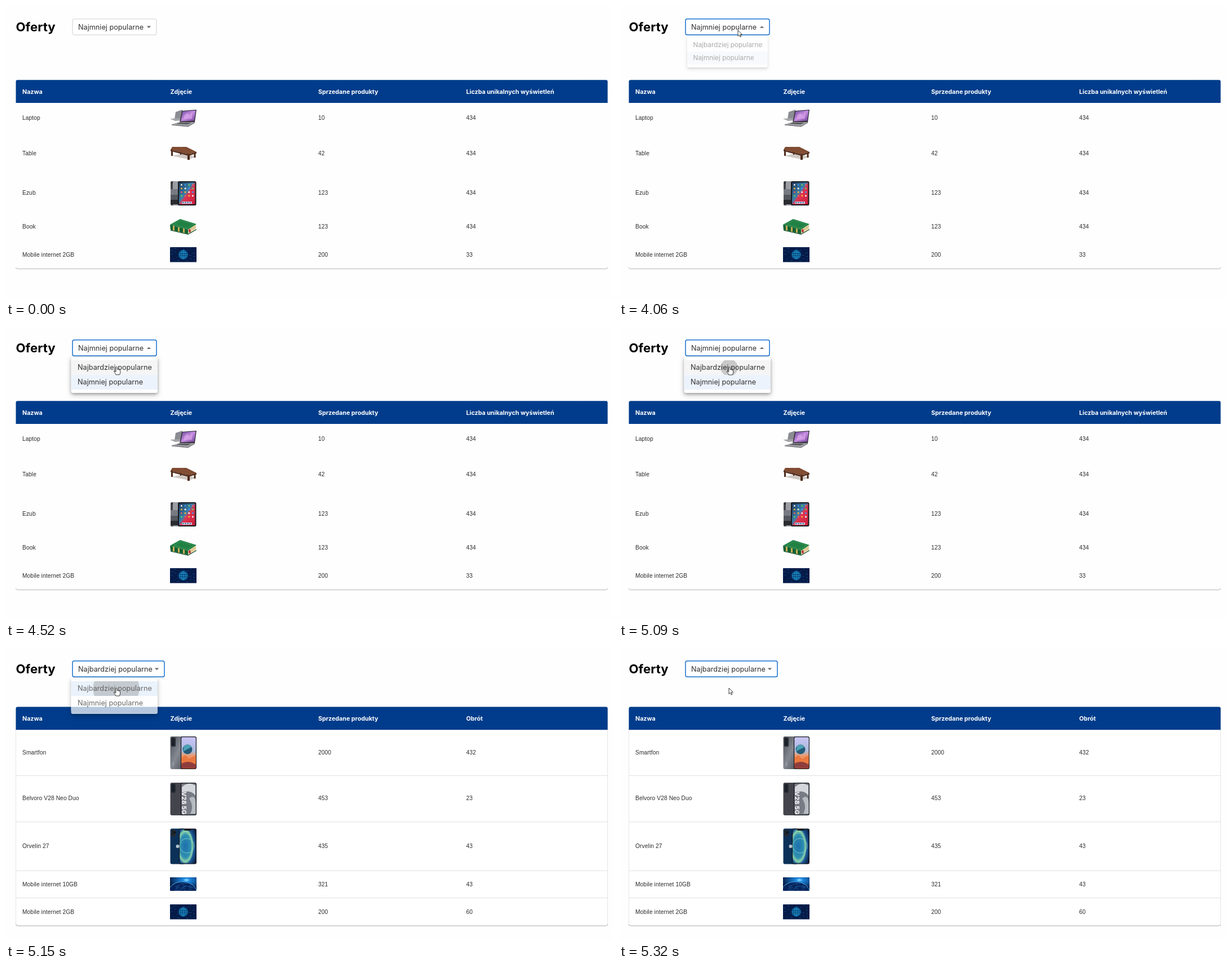
Recreate the animation shown at these times as an HTML page. Size 1077 by 520 pixels, loop 5810 ms.

```html
<!DOCTYPE html>
<html lang="pl">
<head>
<meta charset="utf-8">
<title>Oferty</title>
<style>
  html, body { margin: 0; width: 100%; height: 100%; overflow: hidden; background: #fefefe; }
  svg { display: block; }
  text { font: 10.2px "Liberation Sans", Arial, sans-serif; letter-spacing: .11px; fill: #2b2b2b; }
  .title, .head, .option { font-family: Poppins, Inter, sans-serif; letter-spacing: 0; }
  .title { font-size: 22.2px; font-weight: 700; fill: #000; }
  .head { font-size: 10.7px; font-weight: 700; fill: #fff; }
  .option { font-size: 12.7px; fill: #333; }
  .paper { fill: #fff; filter: drop-shadow(0 2px 2px #0003) drop-shadow(0 3px 4px #0004); }
  .plate text { font: 700 11px Inter, sans-serif; fill: #fff; }
</style>
</head>
<body>
<svg id="stage" width="1077" height="520" viewBox="0 0 1077 520">
  <defs>
    <linearGradient id="dusk" x2="0" y2="1">
      <stop stop-color="#c9c4f7"/><stop offset=".45" stop-color="#a9b9d8"/>
      <stop offset=".6" stop-color="#ee9a6c"/><stop offset="1" stop-color="#d9542f"/>
    </linearGradient>
    <linearGradient id="tabletSky" x2="1" y2="1">
      <stop stop-color="#203a5c"/><stop offset=".45" stop-color="#3c7fa8"/>
      <stop offset=".55" stop-color="#e0344f"/><stop offset="1" stop-color="#c81f3c"/>
    </linearGradient>
    <linearGradient id="steel" x2="1" y2="1">
      <stop stop-color="#4a4d55"/><stop offset=".5" stop-color="#858992"/><stop offset="1" stop-color="#4d5059"/>
    </linearGradient>
    <linearGradient id="lilac" x2="1" y2="1">
      <stop stop-color="#6c4a9c"/><stop offset=".5" stop-color="#c58be0"/><stop offset="1" stop-color="#71409b"/>
    </linearGradient>
    <radialGradient id="aqua" cx=".35" cy=".5" r=".75">
      <stop stop-color="#1d6fae"/><stop offset=".45" stop-color="#2f8fb0"/>
      <stop offset=".6" stop-color="#8fd6a8"/><stop offset=".7" stop-color="#1c5c9c"/><stop offset="1" stop-color="#0b2348"/>
    </radialGradient>
    <radialGradient id="orbit" cx=".62" cy=".2" r=".7">
      <stop stop-color="#9be4ff"/><stop offset=".2" stop-color="#1c86e0"/><stop offset="1" stop-color="#031338"/>
    </radialGradient>
    <clipPath id="firstItem"><rect x="115.5" y="59" width="153.5" height="26"/></clipPath>
    <clipPath id="earthBox"><rect x="291" y="407" width="47" height="24"/></clipPath>
  </defs>
  <text class="title" x="17.5" y="45">Oferty</text>
  <g id="tables"></g>
  <rect id="box" y="23" x="118" height="28.3" rx="3" fill="#fff"/>
  <text class="option" id="label" x="128" y="41.5"></text>
  <path id="arrow" d="M-3.7-1.8H3.7L0 1.9Z" fill="#6d6d6d"/>
  <g id="menu">
    <rect class="paper" x="115.5" y="53" width="153.5" height="64" rx="3"/>
    <rect id="item1" x="115.5" y="59" width="153.5" height="26"/>
    <rect id="item2" x="115.5" y="85" width="153.5" height="26"/>
    <text class="option" x="127" y="76">Najbardziej popularne</text>
    <text class="option" x="127" y="102">Najmniej popularne</text>
    <circle id="ripple" cx="195.5" cy="72" clip-path="url(#firstItem)"/>
  </g>
  <path id="cursor" fill="#fff" stroke="#222" stroke-width=".9" stroke-linejoin="round"/>
</svg>
<script>
const $ = id => document.getElementById(id);
const set = (id, attrs) => { for (const k in attrs) $(id).setAttribute(k, attrs[k]); };

const rect = (x, y, w, h, fill, rx = 0, more = '') =>
  `<rect x="${x}" y="${y}" width="${w}" height="${h}" fill="${fill}" rx="${rx}" ${more}/>`;
const disc = (x, y, r, fill) => `<circle cx="${x}" cy="${y}" r="${r}" fill="${fill}"/>`;
const path = (d, fill, more = '') => `<path d="${d}" fill="${fill}" ${more}/>`;
const line = (d, color, w = 1) => path(d, 'none', `stroke="${color}" stroke-width="${w}"`);
const text = (x, y, s, cls = '') => `<text x="${x}" y="${y}" class="${cls}">${s}</text>`;
const many = (n, f) => Array.from({ length: n }, (_, i) => f(i)).join('');

// Product pictures
const laptop = () =>
  path('M301 188L313 184L311 200L299 201Z', '#8b8c92') +
  path('M291 200L309 199L312 203L300 204Z', '#a4a5a9') +
  path('M312 186L338 184L335 206L308 207Z', '#34313d') +
  path('M313.5 187L336.5 185.3L334 203.5L310 204.5Z', 'url(#lilac)') +
  path('M317 193L322 190L326 195L331 188L330 200L315 201Z', '#e6b2ee', 'opacity=".55"') +
  path('M308 206L335 206L323 213L294 210Z', '#a2a2a5') +
  path('M309 207L329 207L322 210L302 209Z', '#55565b') +
  path('M294 210L323 213L335 206V207.5L323 214.5L294 211.5Z', '#6d6e72');

const table = () =>
  path('M294 266L324 272L337 268L316 261Z', '#cfc9c4') +
  path('M293 255H296V266H293ZM322 262H326V273H322ZM333.5 259H336.5V269H333.5ZM309 258H311V264H309Z', '#4d2a1a') +
  path('M295 250L320 250L338 259L324 263L292 255Z', '#7d4930') +
  path('M292 255L324 263L338 259V261.5L324 266L292 257.5Z', '#55301f') +
  line('M301 250.5L330 261M309 250.5L334 260M296 253L328 262', '#9b6546', .5);

const tablet = () =>
  rect(292, 311, 12, 43, '#45474c', 2) + rect(296, 311, 12, 43, '#9b9da3', 2) +
  rect(292, 325, 14, 10, '#777a82') + rect(292, 335, 14, 9, '#55575e') + rect(292, 344, 14, 8, '#292b30') +
  disc(294.5, 314, 1, '#15161a') +
  rect(305, 311, 32.5, 43, '#16181d', 2.5) + rect(307, 313, 28.5, 39, 'url(#tabletSky)', 1) +
  many(16, i => rect(310 + i % 4 * 6.7, 316 + (i >> 2) * 6.5, 2.7, 2.7,
    ['#f5f5f5', '#65cf68', '#ffb338', '#3798f5', '#f15a63'][i * 3 % 5], .7)) +
  rect(312, 347, 18, 4, '#d8c6d7', 1) + many(4, i => rect(313 + i * 4.2, 347.7, 2.4, 2.4, '#3878a8', .5));

const book = () =>
  path('M292 389L323 397L337 387V396L323 404L292 397Z', '#e9d7a5') +
  line('M323 399.5L337 390M323 401.5L337 392.5', '#b8a06c', .6) +
  path('M291 388L309 378L338 387L323 397Z', '#218145') +
  path('M291 388L323 397V404.5L292 397.5Z', '#126233') +
  path('M296 389.5L299 390.3V399L296 398.3ZM305 392L308 392.8V401L305 400.3ZM314 394.5L317 395.3V403L314 402.3Z', '#c9ae57') +
  line('M298 387.5L310 380.5L333 387.5L322 394.5Z', '#479e61', .7) +
  line('M292 398L323 405L338 396.5', '#124e2b', 1.2) +
  path('M324 397L327 396L328 402L326 401L325 403Z', '#ba2633');

const globe = y => `<g transform="translate(291 ${y})">` +
  rect(0, 0, 47, 26.5, '#051b48') +
  many(22, i => rect(i * 17 % 45, i * 7 % 25, 2 + i % 3, 1, '#123f78')) +
  disc(23.5, 13.3, 9, '#073a70') +
  line('M16.5 13.3a7 7 0 1 0 14 0a7 7 0 1 0-14 0H30.5M23.5 6.3V20.3M20 13.3a3.5 7 0 1 0 7 0a3.5 7 0 1 0-7 0M17.8 9.5H29.2M17.8 17H29.2',
    '#23a8de', .8) + '</g>';

const earth = () => '<g clip-path="url(#earthBox)">' + rect(291, 407, 47, 24, 'url(#orbit)') +
  `<ellipse cx="313" cy="433" rx="25" ry="18" fill="#06245c" stroke="#5acaff" stroke-width=".8"/>` +
  many(18, i => disc(296 + i * 11 % 34, 420 + i * 5 % 11, .6, '#58b7f2')) +
  line('M300 431Q306 414 322 418M307 431Q317 417 333 426', '#2d88d5', .5) + '</g>';

// Back of the phone on the left, screen on the right
const phone = (y, h, split, back, screen, lens) =>
  rect(291.5, y, 26, h, back, 3) + rect(293, y + 2, 8, lens * 4 + 4, '#262b34', 2) +
  many(lens, i => disc(296.5, y + 5 + i * 4.3, 1.8, '#090b10') + disc(296.5, y + 5 + i * 4.3, .7, '#53637a')) +
  rect(split, y, 338 - split, h, '#14171e', 3) +
  rect(split + 1.2, y + 1.3, 335.6 - split, h - 2.6, screen, 2);

const duskPhone = () => phone(157, 58, 310, 'url(#steel)', 'url(#dusk)', 3) +
  disc(322, 180, 8.5, '#245a78') + path('M316 174Q324 168 329 176Q320 180 314 184Z', '#4ba1b5') +
  path('M311.5 195L318 190L325 197L336.5 190V205L324 212L311.5 205Z', '#e9793f') +
  path('M311.5 205Q324 198 336.5 207V213H311.5Z', '#8f3d3c') + line('M297 203V209', '#b8bcc4', .8);

const greyPhone = () => phone(239, 58, 310, '#44454c', '#777b84', 3) +
  path('M312 247Q323 236 336 244V262Q328 250 312 257Z', '#d3d6db') +
  path('M325 267Q337 257 336.5 279V294H327Q334 281 325 267Z', '#b6bac1') +
  '<g class="plate" transform="translate(312 255) rotate(90)"><text>V28 5G</text></g>';

const bluePhone = () => phone(320.5, 63, 307, '#0c3158', 'url(#aqua)', 2) +
  disc(299.5, 327, 1.5, '#090b10') +
  `<circle cx="321" cy="351" r="13" fill="none" stroke="#93dfc3" stroke-width="1" opacity=".7"/>` +
  rect(316, 321, 13, 3, '#14171e', 1.5) + disc(304.5, 352, 3, '#b5c2cf');

// rows: [name, sold, last column, centre y]
const columns = [29, 291.5, 554, 816.5];
function sheet(id, top, bottom, last, rows, lines, pictures) {
  const heads = ['Nazwa', 'Zdjęcie', 'Sprzedane produkty', last];
  return `<g id="${id}">` +
    (lines.length ? rect(17.5, top, 1050, bottom - top, '#fff', 3, 'stroke="#e4e4e4"') : '') +
    line(`M17.5 ${bottom - 3}q0 3 3 3H1064.5q3 0 3-3`, '#b4b6b6') +
    path(`M17.5 ${top + 40.7}V${top + 3}q0-3 3-3H1064.5q3 0 3 3V${top + 40.7}Z`, '#003c8b') +
    heads.map((s, i) => text(columns[i], top + 24.5, s, 'head')).join('') +
    lines.map(y => line(`M18 ${y}H1067`, '#e0e0e0')).join('') +
    rows.map(([name, sold, count, y]) =>
      text(29, y + 3.6, name) + text(554, y + 3.6, sold) + text(816.5, y + 3.6, count)).join('') +
    pictures + '</g>';
}

const least = [['Laptop', 10, 434, 198.5], ['Table', 42, 434, 261], ['Ezub', 123, 434, 331],
  ['Book', 123, 434, 391], ['Mobile internet 2GB', 200, 33, 441]];
const most = [['Smartfon', 2000, 432], ['Belvoro V28 Neo Duo', 453, 23], ['Orvelin 27', 435, 43],
  ['Mobile internet 10GB', 321, 43], ['Mobile internet 2GB', 200, 60]];
const at = ys => most.map((row, i) => [...row, ys[i]]);

$('tables').innerHTML =
  sheet('least', 131.3, 466.5, 'Liczba unikalnych wyświetleń', least, [],
    laptop() + table() + tablet() + book() + globe(428)) +
  sheet('loading', 176.7, 421, 'Obrót', at([236.7, 274.7, 313.5, 351.7, 395.7]),
    [256, 294.4, 332.7, 371], globe(383)) +
  sheet('most', 104.6, 493, 'Obrót', at([185.8, 266.8, 351.8, 419.3, 468]),
    [226.5, 308.5, 395.3, 443.5], duskPhone() + greyPhone() + bluePhone() + earth() + globe(455));

// Timeline, ms
const LOOP = 5810, ENTER = 3630, MOVE = 3700, OPEN = 4000, AIM = 4230, HOVER = 4420,
  PRESS = 4973, CLOSE = 5100, SWAP = 5120, LOADED = 5150, GONE = 5290;

const ARROW = 'M0 0V10.5L2.5 8.3L4.2 12L5.8 11.3L4.2 7.7H7.4Z';
const HAND = 'M-1.2 .6Q0-1 1.2 .6V4.6Q2.4 3.8 3.2 5Q4.4 4.4 5 5.5Q6.6 5.2 6.6 7V10Q6.4 12 5.3 14H-1.2Q-2 11.5-4.3 9Q-5 7.3-3.2 7.6L-1.2 9Z';

// cubic-bezier(.4, 0, .2, 1) over the span from..from + length
function ease(t, from, length) {
  const p = Math.min(1, Math.max(0, (t - from) / length));
  let lo = 0, hi = 1;
  for (let i = 0; i < 20; i++) {
    const s = (lo + hi) / 2, r = 1 - s;
    if (1.2 * r * r * s + .6 * r * s * s + s ** 3 < p) lo = s; else hi = s;
  }
  return lo * lo * (3 - 2 * lo);
}

function draw(t) {
  const swapped = t >= SWAP, open = t >= OPEN && t < SWAP, hover = t >= HOVER;
  const show = { least: !swapped, loading: swapped && t < LOADED, most: t >= LOADED,
    menu: t >= OPEN && t < GONE, cursor: t >= ENTER };
  for (const id in show) $(id).style.display = show[id] ? '' : 'none';

  const go = ease(t, MOVE, 280), aim = ease(t, AIM, 340);
  const x = 22 + 189 * go - 16 * aim, y = 43 + 28 * aim;
  const hand = hover && t < GONE;
  set('cursor', { d: hand ? HAND : ARROW, transform: `translate(${x + (hand ? 1 : 0)} ${y})` });

  const focused = t >= OPEN;
  set('box', { width: swapped ? 163 : 149, 'stroke-width': focused ? 1.5 : 1,
    stroke: focused ? '#1670cf' : t >= ENTER && x > 118 ? '#222' : '#cfcfcf' });
  $('label').textContent = swapped ? 'Najbardziej popularne' : 'Najmniej popularne';
  set('arrow', { transform: `translate(${swapped ? 267.5 : 253.5} 37.3) scale(1 ${open ? -1 : 1})` });

  const grow = ease(t, OPEN, 133) - ease(t, CLOSE + 63, 190);
  const sx = .75 + .25 * grow, sy = .5625 + .4375 * grow;
  set('menu', { opacity: ease(t, OPEN, 195) - ease(t, CLOSE, 190),
    transform: `translate(192 53) scale(${sx} ${sy}) translate(-192 -53)` });
  set('item1', { fill: swapped ? '#e3eefa' : hover ? '#f5f5f5' : '#fff' });
  set('item2', { fill: swapped ? '#fff' : '#edf3fc' });
  const wave = ease(t, PRESS, 550);
  set('ripple', { r: 95 * wave, opacity: t < PRESS ? 0 : .15 + .2 * wave });
}

const start = performance.now();
(function tick() {
  draw((performance.now() - start) % LOOP);
  requestAnimationFrame(tick);
})();
</script>
</body>
</html>
```
